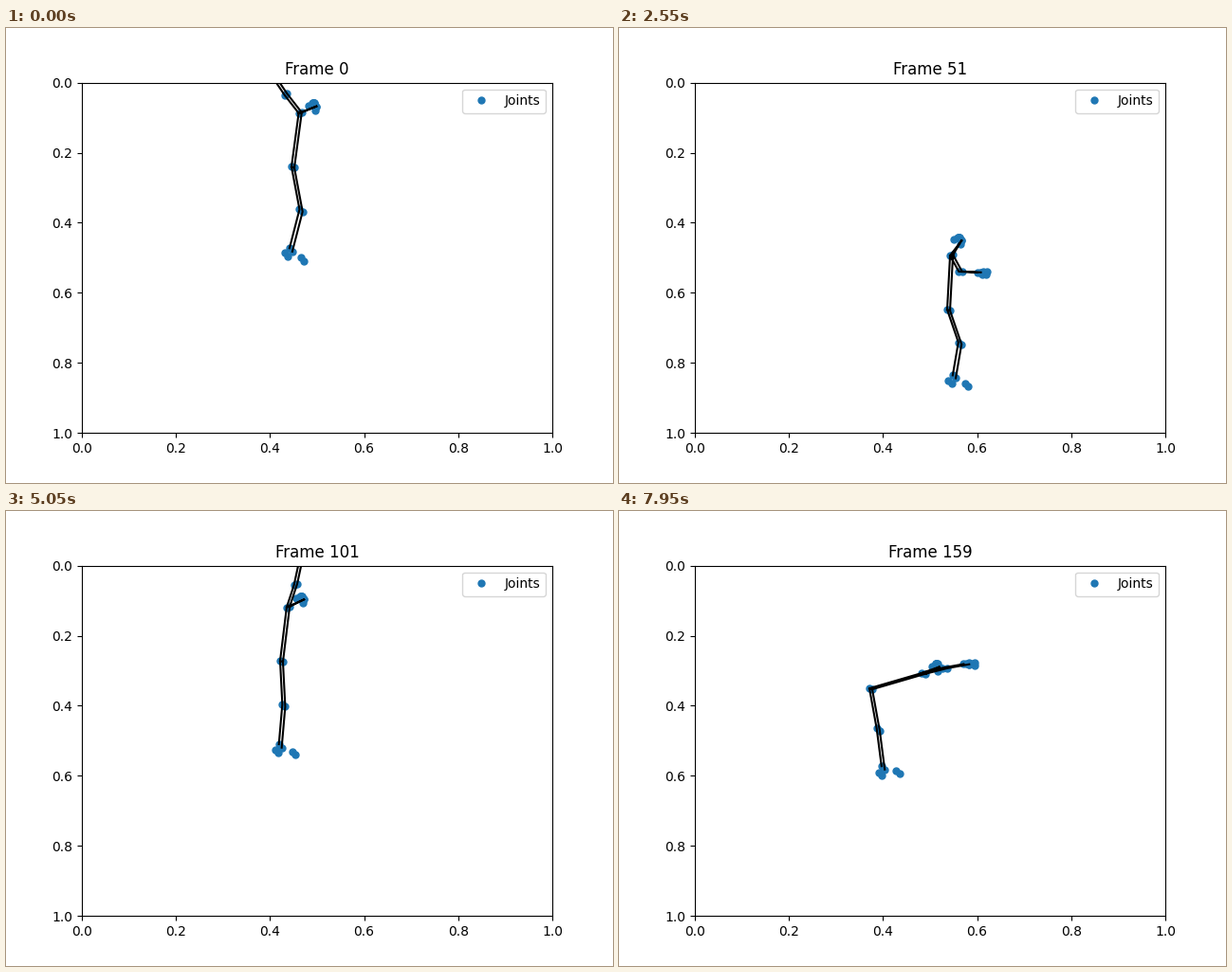
These frames come from a looping animation (640 by 480 pixels, 8 s). A matplotlib script:

```python
import numpy as np
import matplotlib.pyplot as plt
from matplotlib.animation import FuncAnimation

FRAMES = 160
W, H = 640, 480

# Bounces: times of the lowest points, hip height at each peak and on the bed
LOWS = np.array([-30, 16.5, 51.5, 86.5, 127, 168])
PEAKS = [128, 139, 158, 142, 115]
BED = 302
DRIFT_T = [0, 22, 51, 71, 101, 127, 159]
DRIFT_X = [301, 300, 346, 309, 289, 293, 264]

# Limb directions in degrees over one bounce:
# phase, trunk, head, upper arm, forearm, thigh, shin
CYCLE = np.array([
    [0.00, -87, -54, 55, -8, 70, 100],
    [0.16, -86, -43, -35, -52, 91, 97],
    [0.36, -83, -24, -72, -78, 87, 95],
    [0.56, -81, -17, -90, -90, 77, 107],
    [0.80, -86, -35, -218, -218, 85, 96],
    [1.00, -87, -54, -305, -368, 70, 100]])
# The last bounce leaves the bed the same way, then turns over backwards
FLIP = np.vstack([CYCLE[:2],
                  [0.25, -100, -60, -100, -100, 20, 110],
                  [0.78, -376, -379, -374, -370, -280, -277]])


def spline(keys, vals, x):
    """Smooth curve through key values."""
    keys, vals = np.asarray(keys, float), np.asarray(vals, float)
    slope = np.gradient(vals, keys, axis=0)
    i = np.clip(np.searchsorted(keys, x, side="right") - 1, 0, len(keys) - 2)
    h = keys[i + 1] - keys[i]
    u = (x - keys[i]) / h
    return ((1 + 2 * u) * (1 - u) ** 2 * vals[i]
            + u * (1 - u) ** 2 * h * slope[i]
            + u * u * (3 - 2 * u) * vals[i + 1]
            + u * u * (u - 1) * h * slope[i + 1])


def step(p, length, deg):
    a = np.radians(deg)
    return p + length * np.array([np.cos(a), np.sin(a)])


def hip_at(n, bounce, phase):
    s = abs(2 * phase - 1)
    fall = 1.25 * s ** 2 - 0.25 * s ** 6    # free fall, softened by the bed
    y = PEAKS[bounce] + fall * (BED - PEAKS[bounce])
    return np.array([spline(DRIFT_T, DRIFT_X, n), y])


def body_side(hip, size, stretch, dirs):
    """Joints of one side: the drawn chain first, then hand and foot."""
    trunk, head, arm, fore, thigh, shin = dirs
    shoulder = step(hip, 57 * size, trunk)
    nose = step(shoulder, 20, head)
    elbow = step(shoulder, (19 + 6 * stretch) * size, arm)
    wrist = step(elbow, (19 + 6 * stretch) * size, fore)
    knee = step(hip, (36 + 11 * stretch) * size, thigh)
    ankle = step(knee, (35 + 8 * stretch) * size, shin)
    hand = [step(wrist, r, fore + a) for r, a in ((3, 0), (6, -8), (6, 20))]
    foot = [step(ankle, 7, shin + 30), step(ankle, 16, shin - 66)]
    return [nose, shoulder, elbow, wrist, hip, knee, ankle], hand + foot


def face(nose):
    eyes = [nose + (x, -3.5) for x in np.linspace(-4, -2, 6)]
    return eyes + [nose + (-8, -1), nose + (-1.5, 4)]


def skeleton(n):
    bounce = np.searchsorted(LOWS, n, side="right") - 1
    phase = (n - LOWS[bounce]) / (LOWS[bounce + 1] - LOWS[bounce])
    keys = FLIP if bounce == len(PEAKS) - 1 else CYCLE
    dirs = spline(keys[:, 0], keys[:, 1:], phase)
    hip = hip_at(n, bounce, phase)
    stretch = np.sin(np.pi * phase)
    near, near_ends = body_side(hip, 1, stretch, dirs)
    far, far_ends = body_side(hip + (3, 1), 1.03, stretch, dirs)
    far[0] = near[0]
    joints = near + far + near_ends + far_ends + face(near[0])
    gap = np.full(2, np.nan)
    path = []
    for nose, shoulder, elbow, wrist, hip, knee, ankle in (near, far):
        path += [nose, shoulder, elbow, wrist, gap,
                 shoulder, hip, knee, ankle, gap]
    path += [near[1], far[1], gap, near[4], far[4]]
    return np.array(joints), np.array(path)


def to_data(p):
    return ((p - (0.125 * W, 0.12 * H)) / (0.775 * W, 0.77 * H)).T


fig, ax = plt.subplots(figsize=(W / 100, H / 100), dpi=100)
ax.set_xlim(0, 1)
ax.set_ylim(1, 0)
dots, = ax.plot([], [], "o", markersize=5, label="Joints")
lines, = ax.plot([], [], "k-")
title = ax.set_title("Frame 0")
ax.legend(loc="upper right")


def draw(n):
    joints, path = skeleton(n)
    dots.set_data(*to_data(joints))
    lines.set_data(*to_data(path))
    title.set_text(f"Frame {n}")
    return dots, lines, title


anim = FuncAnimation(fig, draw, frames=FRAMES, interval=50, repeat=True,
                     repeat_delay=0, blit=False)
plt.show()
```
